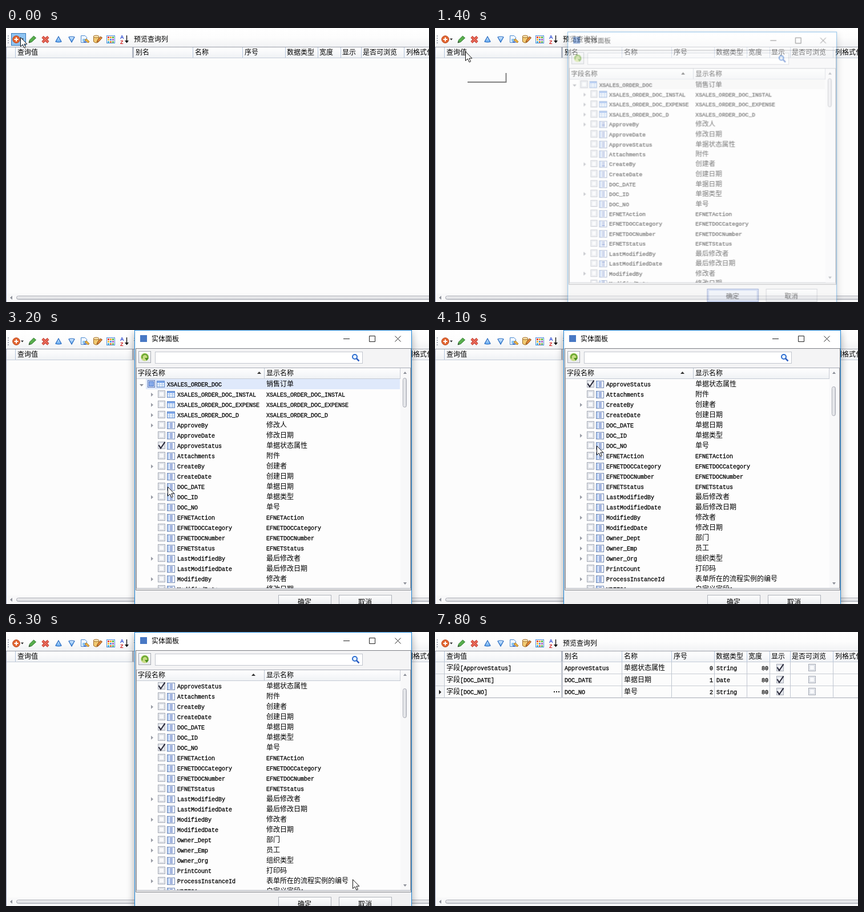
Recreate the animation shown at these times as an HTML page. Size 741 by 481 pixels, loop 8000 ms.

```html
<!DOCTYPE html>
<html lang="zh">
<head>
<meta charset="utf-8">
<title>查询列</title>
<style>
html, body { margin: 0; width: 100%; height: 100%; overflow: hidden; background: #fcfcfc; }
svg { display: block; width: 741px; height: 481px; }
text { font: 12px "Noto Sans CJK SC", "Noto Sans CJK", sans-serif; fill: #000; }
.m { font: 10px "Liberation Mono", monospace; stroke: #000; stroke-width: .3px; }
.end { text-anchor: end; }
.mid { text-anchor: middle; }
rect, .ln { shape-rendering: crispEdges; }
.soft { shape-rendering: auto; }
.shadow { filter: blur(7px); }

/* One loop is 8 s, so 100 ms is 1.25%. */
[data-a] { animation: 8s step-end infinite; }
#cursor { animation-name: cursor; }
#hot { animation-name: hot; }
#tip { animation-name: tip; }
#menu { animation-name: menu; }
#item { animation-name: item; }
#ghost { animation-name: ghost; }
#dialog { animation-name: dialog; transform-origin: 468px 228px; }
#focus { animation-name: focus; }
#list { animation-name: list; }
#thumb { animation-name: thumb; }
#sort { animation-name: sort; }
#rows { animation-name: rows; }
.picked { animation-name: picked; }
.no { animation-name: no; }
.date { animation-name: date; }

@keyframes hot { 0% { opacity: 1 } 16.25%, to { opacity: 0 } }
@keyframes tip { 0% { opacity: 0 } 1.25% { opacity: .5 } 2.5% { opacity: 1 } 5%, to { opacity: 0 } }
@keyframes menu { 0% { opacity: 0 } 5% { opacity: .35 } 6.25% { opacity: .7 } 7.5% { opacity: 1 } 16.25%, to { opacity: 0 } }
@keyframes item { 0% { opacity: 0 } 10%, to { opacity: 1 } }
@keyframes ghost { 0% { opacity: 0 } 16.25% { opacity: 1 } 18.75%, to { opacity: 0 } }
@keyframes dialog {
  0% { opacity: 0; transform: none }
  16.25% { opacity: .2; transform: scale(.93) }
  17.5% { opacity: .52; transform: scale(.9697) }
  18.75% { opacity: 1; transform: none }
  87.5% { opacity: .4; transform: scale(.96) }
  88.75%, to { opacity: 0; transform: none }
}
@keyframes focus { 0% { opacity: 1 } 33.75% { opacity: 0 } 85%, to { opacity: 1 } }
@keyframes picked { 0% { opacity: 0 } 33.75%, to { opacity: 1 } }
@keyframes no { 0% { opacity: 0 } 58.75%, to { opacity: 1 } }
@keyframes date { 0% { opacity: 0 } 71.25%, to { opacity: 1 } }
@keyframes rows { 0% { opacity: 0 } 90%, to { opacity: 1 } }
@keyframes list { 0% { transform: none } 41.25% { transform: translateY(-54px) } 43.75%, to { transform: translateY(-108px) } }
@keyframes thumb { 0% { transform: none } 41.25% { transform: translateY(8px) } 43.75%, to { transform: translateY(15px) } }
@keyframes sort { 0% { transform: none } 36.25% { transform: translateX(10px) } 41.25%, to { transform: none } }
@keyframes cursor {
  0% { transform: translate(25px, 16px) }
  1.25% { transform: translate(25px, 18px) }
  2.5% { transform: translate(25px, 21px) }
  10% { transform: translate(45px, 37px) }
  12.5% { transform: translate(49px, 39px) }
  13.75% { transform: translate(53px, 41px) }
  18.75% { transform: translate(118px, 51px) }
  20% { transform: translate(199px, 69px) }
  21.25% { transform: translate(244px, 108px) }
  22.5% { transform: translate(272px, 150px) }
  23.75% { transform: translate(282px, 178px) }
  25% { transform: translate(280px, 194px) }
  26.25% { transform: translate(277px, 200px) }
  28.75% { transform: translate(275px, 199px) }
  30% { transform: translate(273px, 198px) }
  31.25% { transform: translate(272px, 197px) }
  36.25% { transform: translate(274px, 210px) }
  37.5% { transform: translate(278px, 236px) }
  38.75% { transform: translate(282px, 262px) }
  40% { transform: translate(283px, 275px) }
  45% { transform: translate(283px, 246px) }
  46.25% { transform: translate(282px, 214px) }
  47.5% { transform: translate(281px, 198px) }
  50% { transform: translate(282px, 200px) }
  51.25% { transform: translate(283px, 203px) }
  55% { transform: translate(275px, 203px) }
  61.25% { transform: translate(280px, 197px) }
  63.75% { transform: translate(279px, 190px) }
  65% { transform: translate(277px, 182px) }
  66.25% { transform: translate(274px, 175px) }
  67.5% { transform: translate(271px, 170px) }
  68.75% { transform: translate(270px, 168px) }
  75% { transform: translate(540px, 289px) }
  76.25% { transform: translate(636px, 341px) }
  77.5% { transform: translate(643px, 396px) }
  78.75% { transform: translate(607px, 434px) }
  80% { transform: translate(566px, 456px) }
  81.25% { transform: translate(540px, 467px) }
  82.5% { transform: translate(526px, 471px) }
  83.75% { transform: translate(520px, 472px) }
  91.25% { transform: translate(483px, 396px) }
  93.75% { transform: translate(622px, 259px) }
  95% { transform: translate(708px, 177px) }
  96.25% { transform: translate(725px, 127px) }
  97.5%, to { transform: translate(800px, 100px) }
}
</style>
</head>
<body>
<svg id="stage" viewBox="0 0 741 481"></svg>
<script>
const box = (x, y, w, h, fill, stroke) => stroke
  ? `<rect x="${x + .5}" y="${y + .5}" width="${w - 1}" height="${h - 1}" fill="${fill}" stroke="${stroke}"/>`
  : `<rect x="${x}" y="${y}" width="${w}" height="${h}" fill="${fill}"/>`;
const path = (d, fill, stroke = 'none', w = 1) =>
  `<path d="${d}" fill="${fill}" stroke="${stroke}" stroke-width="${w}"/>`;
const use = (id, x, y) => `<use href="#${id}" x="${x}" y="${y}"/>`;
// Latin runs sit on a 6 px pitch, Chinese on a 12 px pitch.
const text = (x, y, s, cls = '') =>
  `<text x="${x}" y="${y}" class="${cls}">${s.replace(/[\x21-\x7e]+/g, '<tspan class="m">$&</tspan>')}</text>`;
const live = (id, body) => `<g id="${id}" data-a="1">${body}</g>`;
const liveClass = (cls, body) => `<g class="${cls}" data-a="1">${body}</g>`;

const grad = (id, ...stops) => `<linearGradient id="${id}" x2="0" y2="1">${stops.map((c, i) =>
  `<stop offset="${i / (stops.length - 1)}" stop-color="${c}"/>`).join('')}</linearGradient>`;

const defs = `<defs>
  ${grad('bar', '#fff', '#fdfdfd', '#f1f2f4')}${grad('head', '#fff', '#f0f2f5')}
  ${grad('btn', '#fdfdfd', '#e6e8ec')}${grad('tri', '#dff0ff', '#5aa5f0')}
  ${grad('roll', '#f6f6f7', '#d2d4d9')}
  <linearGradient id="rollV"><stop stop-color="#f4f4f6"/><stop offset="1" stop-color="#d4d6dc"/></linearGradient>
  <clipPath id="view"><path d="M229 86h479v367H229z"/></clipPath>
  <g id="cb">${box(0, 0, 13, 13, '#eceef2', '#a4a9b4')}${box(2, 2, 9, 9, '#f8f9fb', '#d4d8e0')}</g>
  <g id="tick">${path('M1.500 6L5 11.500L12.500 .5', 'none', '#2c2c3c', 2.2)}</g>
  <g id="table">${box(0, 0, 14, 12, '#fff', '#5f88c8')}${box(1, 1, 12, 3, '#7fa8ea')}
    <path class="ln" d="M1 6.5h12M1 9.5h12M4.5 4v7M9.5 4v7" stroke="#9dbfea"/></g>
  <g id="field">${box(0, 0, 14, 13, '#fff', '#7088b4')}${box(1, 1, 3, 11, '#b8d0f5')}
    <path class="ln" d="M5 2.5h5M5 4.5h5M5 6.5h5M5 8.5h5M5 10.5h5" stroke="#4a6cc0"/></g>
</defs>`;

const columns = [
  [20, '查询值', 16], [227, '别名', 222], [331, '名称', 327], [418, '序号', 414], [492, '数据类型', 489],
  [549, '宽度', 546], [589, '显示', 586], [625, '是否可浏览', 622], [701, '列格式化', 697]];

function toolbar() {
  const colors = ['#e8483c', '#f0a030', '#58b848', '#f0c040', '#4a90e0', '#b060c0', '#50b8d8', '#f08040', '#70c060'];
  let s = box(0, 0, 741, 33, 'url(#bar)');
  for (let y = 13; y < 27; y += 4) s += box(3, y, 2, 2, '#a9aeb8');
  s += live('hot', box(9, 9, 26, 22, '#8fc4f2', '#3478b8'));
  s += '<circle cx="18" cy="20" r="6.3" fill="#e2642f" stroke="#b8441c"/>' + path('M14.5 20h7M18 16.5v7', 'none', '#fff', 2);
  s += path('M26 18.5h5l-2.5 3z', '#222');
  s += path('M40 26l1.5-5 7-7 4 3.5-7.500 7z', '#58ae4c', '#2f7a30') + path('M40 26l1-3 2 2z', '#444');
  s += path('M64 15.500l10 9.500M74 15.500l-10 9.500', 'none', '#b83228', 4.5) + path('M64 15.500l10 9.500M74 15.500l-10 9.500', 'none', '#ea6a58', 2.5);
  s += path('M92 15l5 9q-5 2-10 0z', 'url(#tri)', '#2468c0', 1.2);
  s += path('M115 25l-5-9q5-2 10 0z', 'url(#tri)', '#2468c0', 1.2);
  s += path('M131.500 13.500h7l3 3v9h-10z', '#f4f9ff', '#4888d0') + box(134, 19, 6, 5, '#8cc4f0')
    + path('M138 21l3-2 5 5-2 2z', '#f0b848', '#a87020') + path('M135 25l4-2 2 3z', '#4868c0');
  s += path('M153.500 15v9q5 4 9 0v-9z', '#f2cc74', '#a06820') + '<ellipse cx="158" cy="15" rx="5" ry="2" fill="#fbe8b4" stroke="#a06820"/>'
    + path('M159 25l1.500-4 5-6 3 2-5 6z', '#e08838', '#8c4c18');
  s += box(176, 13, 15, 14, '#fff', '#4888d8');
  colors.forEach((c, i) => s += box(178 + i % 3 * 4, 15 + (i / 3 | 0) * 4, 3, 3, c));
  s += '<text x="200" y="19" style="font:bold 9px Liberation Sans,sans-serif;fill:#2040d0">A</text>'
    + '<text x="200" y="28" style="font:bold 9px Liberation Sans,sans-serif;fill:#d02020">Z</text>'
    + path('M211.500 13v10', 'none', '#111', 1.4) + path('M208 22h7l-3.500 4.500z', '#111');
  return s + text(224, 24, '预览查询列');
}

function grid() {
  let s = box(0, 33, 741, 1, '#9a9ea8') + box(1, 34, 740, 18, 'url(#head)') + box(0, 52, 741, 1, '#c4ccd8');
  columns.forEach(([x, name, line]) => {
    s += box(line, 34, 1, 18, '#b4c4da') + text(x, 47, name);
  });
  s += box(221, 34, 3, 18, '#b2b8c4') + box(0, 33, 1, 448, '#9096b0');
  s += box(1, 466, 740, 14, '#f8f8f9') + path('M11 470v7l-4-3.500z', '#8c8f98');
  return s + '<rect class="soft" x="18.500" y="470.500" width="740" height="6" rx="3" fill="url(#roll)" stroke="#a4a7b0"/>';
}

function resultRows() {
  const data = [['ApproveStatus', '单据状态属性', 'String'], ['DOC_DATE', '单据日期', 'Date'], ['DOC_NO', '单号', 'String']];
  let s = '';
  data.forEach(([name, label, type], i) => {
    const y = 53 + 21 * i, base = y + 14;
    s += box(1, y, 15, 20, '#f4f5f7') + box(1, y + 20, 740, 1, i < 2 ? '#c8ccd4' : '#a8acb6');
    s += text(20, base, `字段[${name}]`) + text(227, base, name) + text(331, base, label)
      + text(487, base, String(i), 'end') + text(493, base, type) + text(584, base, '80', 'end');
    s += use('cb', 598, y + 3) + use('tick', 598, y + 3) + use('cb', 654, y + 3);
  });
  columns.forEach(([, , x]) => s += box(x, 53, 1, 63, '#c0c6d0'));
  s += box(221, 53, 3, 63, '#c4c8d0') + path('M7 101.500v8l4-4z', '#222');
  for (let x = 208; x < 218; x += 4) s += box(x, 104, 2, 2, '#222');
  return live('rows', s);
}

// '+' marks a node that can be expanded, '#' one that is a table.
const fields = `XSALES_ORDER_DOC_INSTAL +#|XSALES_ORDER_DOC_EXPENSE +#|XSALES_ORDER_DOC_D +#|ApproveBy + 修改人
ApproveDate - 修改日期|ApproveStatus - 单据状态属性|Attachments - 附件|CreateBy + 创建者|CreateDate - 创建日期
DOC_DATE - 单据日期|DOC_ID + 单据类型|DOC_NO - 单号|EFNETAction -|EFNETDOCCategory -|EFNETDOCNumber -|EFNETStatus -
LastModifiedBy + 最后修改者|LastModifiedDate - 最后修改日期|ModifiedBy + 修改者|ModifiedDate - 修改日期|Owner_Dept + 部门
Owner_Emp + 员工|Owner_Org + 组织类型|PrintCount - 打印码|ProcessInstanceId + 表单所在的流程实例的编号|XDEFS1 - 自定义字段1`
  .split(/[|\n]/).map(f => f.split(' '));
const ticks = { ApproveStatus: 'picked', DOC_DATE: 'date', DOC_NO: 'no' };

function tree() {
  let s = box(245, 86, 445, 18, '#f3f3f4') + liveClass('picked', box(245, 86, 445, 18, '#dfe9fb'));
  s += path('M234 95h7l-3.500 4z', '#8c8f98') + use('cb', 248, 88)
    + liveClass('picked', box(248, 88, 13, 13, '#e4edfb', '#5874b4') + box(250, 90, 9, 9, '#86aaea', '#5078c8'))
    + use('table', 264, 89) + text(282, 99, 'XSALES_ORDER_DOC') + text(456, 99, '销售订单');
  fields.forEach(([name, kind, label], i) => {
    const y = 113 + 18 * i;
    if (kind[0] === '+') s += path(`M254 ${y - 3}v7l4-3.500z`, '#9a9da6');
    s += use('cb', 266, y - 7);
    if (ticks[name]) s += liveClass(ticks[name], use('tick', 266, y - 7));
    s += use(kind[1] ? 'table' : 'field', 282, y - 6) + text(300, y + 4, name) + text(456, y + 4, label || name);
  });
  return `<g clip-path="url(#view)">${live('list', s)}</g>`;
}

function dialog() {
  let s = '<rect class="shadow" x="225" y="4" width="486" height="500" fill="#0005"/>';
  s += box(225, 0, 486, 500, '#f1f1f2', '#1883d7') + box(226, 1, 484, 31, '#fff');
  s += box(235, 9, 12, 12, '#4878c4') + text(255, 20, '实体面板');
  s += path('M591 15.500h11M636.500 10.500h10v10h-10zM681.500 10.500l10 10M691.500 10.500l-10 10', 'none', '#222');
  s += box(227, 32, 483, 425, '#f4f4f5', '#7c7e84');
  s += box(232, 37, 22, 21, 'url(#btn)', '#a8acb4')
    + '<circle cx="243" cy="47.500" r="7" fill="#c8dc84"/>'
    + path('M239 50a5 5 0 1 1 7.500 1.500', 'none', '#6aa832', 2.5) + path('M243 49l7 0-3.500 5z', '#4e9020');
  s += box(261, 38, 364, 21, '#fff', '#c2c6ce')
    + '<circle cx="611" cy="47" r="4" fill="#eaf4ff" stroke="#2f6fd0" stroke-width="2"/>' + path('M614 50l4.500 4.500', 'none', '#2f5fc0', 2.5);
  s += box(228, 66, 481, 388, '#fdfdfd', '#a6aab4') + box(229, 67, 462, 18, 'url(#head)') + box(229, 85, 462, 1, '#c4cad4')
    + box(452, 67, 1, 18, '#bcc4d0') + box(690, 67, 1, 18, '#c8ccd4');
  s += text(231, 80, '字段名称') + text(456, 80, '显示名称') + live('sort', path('M430 77h7l-3.500-4z', '#333'));
  s += tree();
  s += box(691, 67, 17, 386, '#f8f8f9') + path('M696 77h6l-3-4z', '#8c8f98') + path('M696 443h6l-3 4z', '#8c8f98')
    + live('thumb', '<rect class="soft" x="695.500" y="84.500" width="6" height="51" rx="3" fill="url(#rollV)" stroke="#a4a7b0"/>');
  s += box(477, 465, 93, 24, 'url(#btn)', '#aeb2ba') + box(583, 465, 93, 24, 'url(#btn)', '#aeb2ba');
  s += live('focus', box(477, 465, 93, 24, '#e4ecfa', '#3f5fb4') + box(479, 467, 89, 20, '#e6ecf8', '#8fa8e0'));
  return live('dialog', s + text(523, 482, '确定', 'mid') + text(629, 482, '取消', 'mid'));
}

function popups() {
  let m = box(12, 35, 125, 96, '#0002') + box(9, 32, 125, 96, '#fdfdfd', '#a0a6b2') + box(10, 33, 23, 94, '#f0f2f5');
  m += live('item', box(11, 34, 121, 22, '#cfe3f8', '#6ca4dc'));
  ['实体字段', '计算字段', '常量字段', '空白字段'].forEach((s, i) => m += text(40, 49 + 23 * i, s));
  return live('tip', box(31, 56, 45, 16, '#0003') + box(29, 54, 45, 16, '#fff', '#999') + text(33, 66, '增加列'))
    + live('menu', m)
    + live('ghost', path('M57 95h67.500V79', 'none', '#808080', 2));
}

const pointer = live('cursor', path('M.5 .5v16l3.700-3.500 2.800 6 2.500-1.200-2.700-5.600h5z', '#fff', '#111'));

document.getElementById('stage').innerHTML =
  defs + box(0, 0, 741, 481, '#fcfcfc') + toolbar() + grid() + resultRows() + popups() + dialog() + pointer;
</script>
</body>
</html>
```
